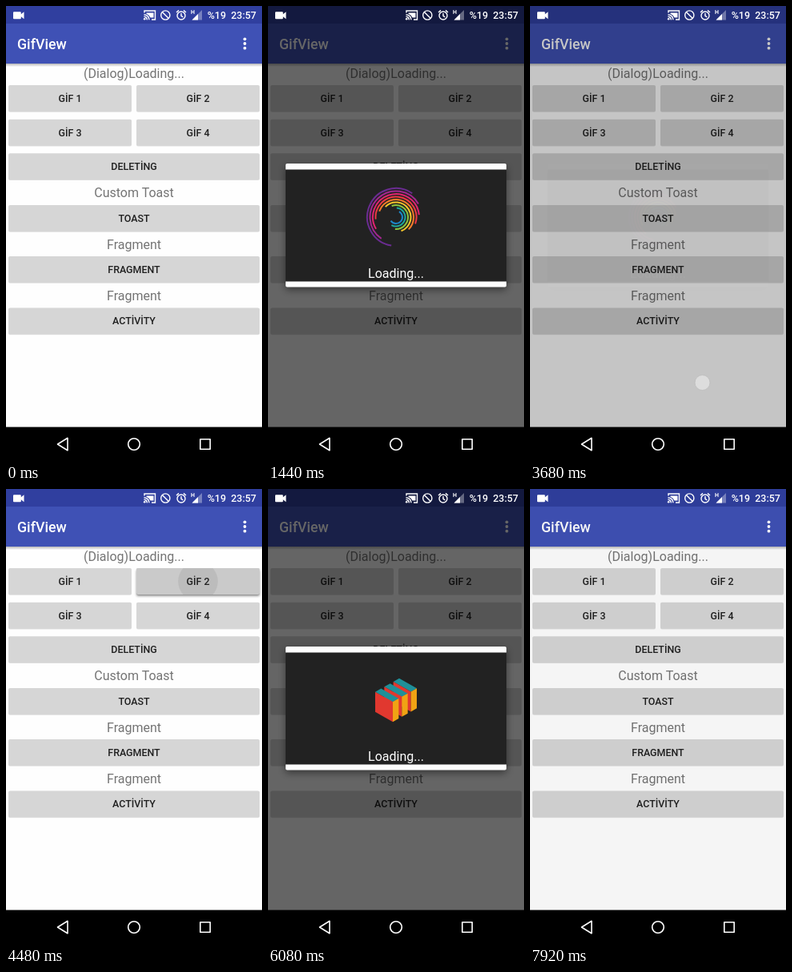
These frames come from a looping animation (320x569 px, 8 s). An HTML page:

```html
<!DOCTYPE html>
<html lang="en">
<head>
<meta charset="utf-8">
<title>GifView</title>
<style>
  html, body { margin: 0; width: 100%; height: 100%; overflow: hidden; background: #000; }
  svg { display: block; width: 100%; height: 100%; font-family: Roboto, "Open Sans", sans-serif; }
  .label { font-size: 16px; fill: #747474; text-anchor: middle; }
  .caption { font-size: 12.44px; font-weight: 500; fill: #202020; text-anchor: middle; }
  .status { font-size: 12.44px; font-weight: 500; fill: #fff; }
</style>
</head>
<body>
<svg id="stage" viewBox="0 0 320 569">
  <defs>
    <linearGradient id="barShade" x2="0" y2="1">
      <stop offset="0" stop-opacity=".28"/>
      <stop offset="1" stop-opacity="0"/>
    </linearGradient>
    <filter id="soft" x="-20%" y="-40%" width="140%" height="180%"><feGaussianBlur stdDeviation="1.6"/></filter>
    <filter id="deep" x="-20%" y="-20%" width="140%" height="140%"><feGaussianBlur stdDeviation="5"/></filter>
    <clipPath id="pressClip"><rect id="pressBox" y="99" width="154" height="33" rx="2"/></clipPath>
  </defs>

  <rect width="320" height="569" fill="#fefefe"/>
  <rect y="72" width="320" height="4" fill="url(#barShade)"/>
  <rect width="320" height="22" fill="#303f9f"/>
  <rect y="22" width="320" height="50" fill="#3f51b5"/>
  <text x="14" y="54" font-size="17.8" font-weight="500" fill="#fff">GifView</text>
  <g fill="#fff">
    <circle cx="298.5" cy="41.3" r="1.9"/><circle cx="298.5" cy="47" r="1.9"/><circle cx="298.5" cy="52.7" r="1.9"/>
  </g>
  <g id="page"></g>
  <g id="press">
    <rect id="pressShade" y="101" width="154" height="33" rx="2" opacity=".4" filter="url(#soft)"/>
    <g clip-path="url(#pressClip)">
      <rect id="pressFill" y="99" width="154" height="33" fill="#cacaca"/>
      <circle id="ripple" cy="115.5" fill="#000" opacity=".07"/>
    </g>
    <text id="pressText" class="caption" y="120"></text>
  </g>

  <rect id="dim" width="320" height="527"/>

  <g id="dialog">
    <rect x="22" y="201" width="276" height="154" rx="2" opacity=".45" filter="url(#deep)"/>
    <rect x="22" y="197" width="276" height="154.5" rx="2" fill="#fdfdfd"/>
    <rect x="22" y="204.5" width="276" height="140" fill="#222"/>
    <g id="swirl" fill="none" stroke-width="2"></g>
    <g id="cube"></g>
    <text x="160" y="340" font-size="16" fill="#fff" text-anchor="middle">Loading...</text>
  </g>
  <circle id="touch" cx="215.5" cy="471" r="9.5" fill="#fff" stroke="#aaa" stroke-width=".7"/>

  <!-- status icons -->
  <g fill="#fff">
    <path d="M9 8.2q0-1 1-1h7.8q1 0 1 1v2l3.7-3v9l-3.7-3v2q0 1-1 1H10q-1 0-1-1z"/>
    <path d="M175.5 8.5h9v6h-4q-1.5-3.5-5-4.7z"/>
    <circle cx="173.2" cy="16.3" r="1.3"/>
  </g>
  <g fill="none" stroke="#fff" stroke-width="1.4">
    <path d="M173 8.5V6h13.5v11H182M172.5 13.3q3.5.3 4 4M172.5 10.8q6 .5 6.500 6.500"/>
    <circle cx="199.300" cy="11.500" r="5.600"/>
    <path d="M195.300 7.500l8 8"/>
    <circle cx="219" cy="12" r="5"/>
    <path d="M219 9v3.300l2.300 1.500M213 8l3-2.600M225 8l-3-2.600"/>
  </g>
  <path d="M245 5v12.500h-12.500z" fill="#fff" opacity=".35"/>
  <path d="M240 10v7.500h-7.500z" fill="#fff"/>
  <text x="231" y="10" font-size="7" font-weight="700" fill="#fff">H</text>
  <text class="status" x="251.700" y="16">%19</text>
  <text class="status" x="281.300" y="16">23:57</text>

  <!-- navigation bar -->
  <rect y="526.500" width="320" height="43"/>
  <g fill="none" stroke="#fff" stroke-width="1.600" stroke-linejoin="round">
    <path d="M77 540.300v15.400L64.500 548z"/>
    <circle cx="160" cy="548" r="7.300"/>
    <rect x="242.800" y="541.800" width="12.400" height="12.400"/>
  </g>
</svg>
<script>
const LOOP = 8000, CX = 160, CY = 264;
const $ = id => document.getElementById(id);
const clamp = v => Math.max(0, Math.min(1, v));

function add(parent, tag, attrs, text) {
  const el = document.createElementNS("http://www.w3.org/2000/svg", tag);
  for (const k in attrs) el.setAttribute(k, attrs[k]);
  if (text) el.textContent = text;
  return parent.appendChild(el);
}
function set(el, attrs) {
  for (const k in attrs) el.setAttribute(k, attrs[k]);
}

// Page content
const page = $("page");
function button(x, y, w, text) {
  add(page, "rect", { x, y: y + .8, width: w, height: 33, rx: 2, fill: "#000", opacity: .12 });
  add(page, "rect", { x, y, width: w, height: 33, rx: 2, fill: "#d6d6d6" });
  add(page, "text", { x: x + w / 2, y: y + 21, class: "caption" }, text);
}
function label(y, text) {
  add(page, "text", { x: 160, y, class: "label" }, text);
}
label(89.5, "(Dialog)Loading...");
button(3, 99, 154, "GİF 1");
button(163, 99, 154, "GİF 2");
button(3, 141.8, 154, "GİF 3");
button(163, 141.8, 154, "GİF 4");
button(3, 184.3, 314, "DELETİNG");
label(239, "Custom Toast");
button(3, 249, 314, "TOAST");
label(303.5, "Fragment");
button(3, 313, 314, "FRAGMENT");
label(367.5, "Fragment");
button(3, 377.4, 314, "ACTİVİTY");

// Rainbow swirl, outermost ring first
const rings = ["#6a2c91", "#a3278f", "#e0246f", "#ee3a43", "#f47b2a", "#f5c52b", "#8cc43f", "#1fa79a", "#1c86c8"]
  .map(stroke => add($("swirl"), "path", { stroke }));
function drawSwirl(ms) {
  const turn = ms / 1200 * 360;
  rings.forEach((ring, i) => {
    const r = 36 - i * 3.5;
    const end = 208 + i * 25 + turn;
    const at = deg => {
      const a = deg * Math.PI / 180;
      return (CX + r * Math.cos(a)).toFixed(2) + " " + (CY + r * Math.sin(a)).toFixed(2);
    };
    ring.setAttribute("d", `M${at(end - 205)}A${r} ${r} 0 1 1 ${at(end)}`);
  });
}

// Isometric cube cut into three slabs along one axis after another
const faces = Array.from({ length: 3 }, () =>
  ["#1f9099", "#e1382f", "#f0a314"].map(fill => add($("cube"), "polygon", { fill })));
function drawCube(ms) {
  const step = ms / 1200, axis = Math.floor(step) % 3;
  const gap = .68 * Math.sin(Math.PI * (step % 1)) ** 2;
  faces.forEach((face, n) => {
    const i = axis === 1 ? 2 - n : n;
    const lo = [-.5, -.5, -.5], hi = [.5, .5, .5];
    lo[axis] = -.5 + i / 3 + (i - 1) * gap;
    hi[axis] = lo[axis] + 1 / 3;
    const [a, b, c] = lo, [A, B, C] = hi;
    const points = list => list.map(([u, v, z]) =>
      (CX + 22 * (u + v)).toFixed(2) + "," + (CY + 12.5 * (u - v) - 25 * z).toFixed(2)).join(" ");
    [
      [[a, b, C], [a, B, C], [A, B, C], [A, b, C]],
      [[a, b, C], [A, b, C], [A, b, c], [a, b, c]],
      [[A, b, C], [A, B, C], [A, B, c], [A, b, c]]
    ].forEach((quad, k) => face[k].setAttribute("points", points(quad)));
  });
}

const shows = [
  { press: 880, open: 1160, close: 3555, x: 3, tapX: 104.5, text: "GİF 1" },
  { press: 4410, open: 4674, close: 7733, x: 163, tapX: 240, text: "GİF 2" }
];

function drawPress(show, t) {
  const age = t - show.press;
  const on = age > 0 && age < 420;
  $("press").style.display = on ? "" : "none";
  if (!on) return;
  for (const id of ["pressBox", "pressShade", "pressFill"]) $(id).setAttribute("x", show.x);
  set($("press"), { opacity: clamp(age / 60) * clamp((420 - age) / 160) });
  set($("ripple"), { cx: show.tapX, r: age * .35 });
  set($("pressText"), { x: show.x + 77 });
  $("pressText").textContent = show.text;
}

function draw(t) {
  const index = t < 4200 ? 0 : 1, show = shows[index];
  drawPress(show, t);

  const inP = clamp((t - show.open) / 220), outP = clamp((t - show.close) / 200);
  const ease = 1 - (1 - inP) ** 2;
  set($("dim"), { opacity: .6 * ease * (1 - outP) });

  const alpha = clamp(inP * 1.6) * clamp(1 - outP * 1.56);
  const scale = .92 + .08 * ease;
  $("dialog").style.display = alpha > 0 ? "" : "none";
  set($("dialog"), {
    opacity: alpha,
    transform: `translate(160 274) scale(${scale}) translate(-160 -274)`
  });
  $("swirl").style.display = index ? "none" : "";
  $("cube").style.display = index ? "" : "none";
  const ms = Math.max(0, t - show.open);
  if (index) drawCube(ms); else drawSwirl(ms - 1160);

  const tap = t - show.close;
  set($("touch"), { opacity: tap > 0 ? .42 * clamp((180 - tap) / 50) : 0 });
}

const start = performance.now();
function tick() {
  draw((performance.now() - start) % LOOP);
  requestAnimationFrame(tick);
}
tick();
</script>
</body>
</html>
```
